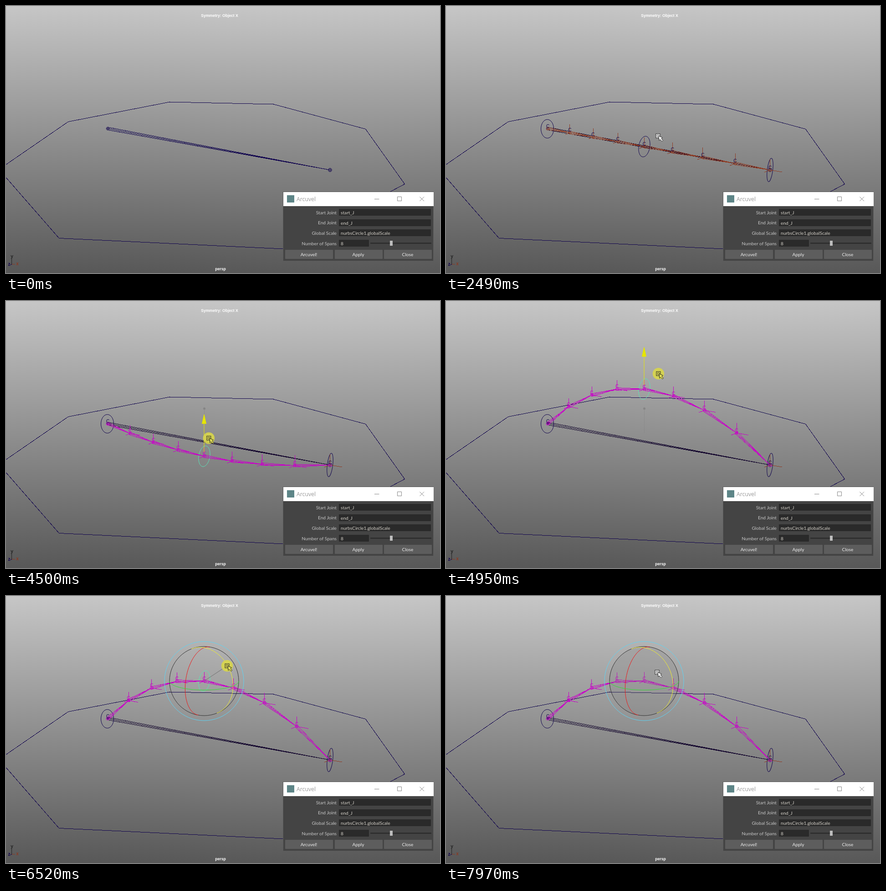
These frames come from a looping animation (953x587 px, 7990 ms). An HTML page:

```html
<!DOCTYPE html>
<html lang="en">
<head>
<meta charset="utf-8">
<title>Joint bend rig</title>
<style>
  html, body { margin: 0; width: 100%; height: 100%; overflow: hidden; background: #555; }
  svg { display: block; }
  text { font-family: Lato, "Open Sans", sans-serif; font-size: 10.2px; }
  .hud, .mark { font-family: "Liberation Sans", Arial, sans-serif; text-anchor: middle; }
  .hud { font-weight: bold; font-size: 8.6px; fill: #fff; }
  .mark { font-size: 10px; }
  .thin { fill: none; stroke-width: 1; }
  .crisp { shape-rendering: crispEdges; }
</style>
</head>
<body>
<svg width="953" height="587" viewBox="0 0 953 587">
  <defs>
    <linearGradient id="sky" x1="0" y1="0" x2="0" y2="1">
      <stop offset="0" stop-color="#c6c6c6"/><stop offset="1" stop-color="#585858"/>
    </linearGradient>
  </defs>
  <rect width="953" height="587" fill="url(#sky)"/>
  <text class="hud" x="469" y="24">Symmetry: Object X</text>
  <text class="hud" x="471" y="581">persp</text>
  <g class="thin">
    <path stroke="#222" d="M12.5 556V568"/><path stroke="#8a3a24" d="M13 567.5L20 568"/><path stroke="#13064f" d="M13 568L9 569"/>
  </g>
  <g font-weight="bold">
    <text class="mark" x="13" y="554" fill="#222">y</text>
    <text class="mark" x="7" y="571" fill="#13064f">z</text>
    <text class="mark" x="25" y="570" fill="#8a3a24">x</text>
  </g>

  <g class="thin" transform="translate(.5 .5)">
    <path class="crisp" stroke="#13064f" d="M-1 348.5L136 254L359 210.5L587 215.5L789 270L875 391L835 412M-1 376L116 510L640 535"/>
    <path id="mainBone" class="crisp"/>
    <path id="mainJoints" stroke="#13064f"/>

    <g id="rig">
      <g stroke="#13064f">
        <ellipse cx="222" cy="269.5" rx="14" ry="20.5"/>
        <ellipse cx="711" cy="360" rx="6" ry="26" transform="rotate(7 711 360)"/>
      </g>
      <path id="ring"/>
      <path id="endAxes" class="crisp" stroke="#8f3d25"/>
      <path id="bones" class="crisp"/>
      <path id="axes" class="crisp"/>
      <g id="marks" stroke="none"></g>
    </g>

    <g id="ghost" stroke="#868686" opacity=".6">
      <path d="M435 236V290"/><circle cx="435" cy="236" r="2.5" fill="#777"/>
    </g>
    <g id="mover">
      <path id="arrowX" stroke="#d02020" fill="#d02020"/>
      <path id="arrowZ" stroke="#2038d0" fill="#2038d0"/>
      <path id="arrowY" stroke="#e6e600" fill="#e6e600"/>
      <rect id="handle" x="-8" y="-8" width="16" height="16" stroke="#5fe0c8"/>
    </g>
    <g id="rotator">
      <circle id="ball" r="76" fill="#808080" fill-opacity=".25"/>
      <circle r="87" stroke="#5fd3f3"/>
      <circle r="76" stroke="#333"/>
      <path id="arcX" stroke="#f01818"/>
      <path id="arcY" stroke="#2fe02f"/>
      <path id="arcZ"/>
      <path id="sweep" stroke="#808080"/>
    </g>
  </g>

  <g id="dialog">
    <rect x="608.5" y="408.5" width="330" height="152" fill="#444" stroke="#5a5a5a"/>
    <rect x="609" y="409" width="330" height="31" fill="#fff"/>
    <rect x="617" y="416" width="16" height="16" fill="#5d8587"/>
    <text id="title" x="638" y="429" style="font:12.3px 'Open Sans',sans-serif">Arcuvel</text>
    <path class="thin" stroke="#888" d="M809 424.5H819.5M859.5 419.5H868.5V428.5H859.5ZM908.5 419.5L918 429M918 419.5L908.5 429"/>
    <g id="form"></g>
    <path d="M800 521.5H934" stroke="#262626" stroke-width="2"/>
    <rect x="843" y="516" width="6" height="11" fill="#bdbdbd"/>
  </g>

  <g id="cursor">
    <circle id="press" r="12.7" fill="#d8d64c" opacity=".92"/>
    <g id="picker" stroke="#222">
      <rect x="-4.5" y="-4.5" width="9" height="9"/><rect x="-2" y="-2" width="4" height="4" fill="none" stroke-width=".7"/>
      <path d="M1.5 0L2.5 10L5 8L9 12L11 10L7.5 6L10 4Z"/>
    </g>
    <path id="pointer" fill="#fff" stroke="#111" d="M.5 .5V16L4 12.7L6.5 18.5L9 17.4L6.6 11.8H11.5Z"/>
  </g>
</svg>
<script>
const $ = id => document.getElementById(id);
const set = (el, attrs) => { for (const k in attrs) el.setAttribute(k, attrs[k]); };
const show = (id, on) => { $(id).style.display = on ? '' : 'none'; };
const between = (t, a, b) => t >= a && t < b;
const ramp = (t, a, b) => {
  const s = Math.min(1, Math.max(0, (t - a) / (b - a)));
  return s * s * (3 - 2 * s);
};

const LOOP = 7990, SPANS = 8;
const NAVY = '#13064f', BROWN = '#8f3d25', MAGENTA = '#c800c8';

// Moments of the story, in ms.
const APPLY = 1290, BUILT = 1490, DESELECT = 2390, SELECT = 3010, MOVE_TOOL = 3560;
const GRAB = 3980, DROP = 5460, ROTATE_TOOL = 5640, TWIST = 6480, RELEASE = 7690, UNDO = 7720;
const PRESSES = [[APPLY, 1440], [2330, 2410], [2930, 3110], [GRAB, DROP], [TWIST, RELEASE]];

const liftAt = t => 69 * ramp(t, 4080, 4280) - 141 * ramp(t, 4280, 4620) +
  189 * ramp(t, 4620, 4970) + 5 * ramp(t, 5300, 5450);
const twistAt = t => 40 * ramp(t, 6520, 6870) - 73 * ramp(t, 6870, 7450);

function cursorAt(t) {
  let x = 842, y = 587;
  const go = (a, b, toX, toY) => {
    const e = ramp(t, a, b);
    x += (toX - x) * e;
    y += (toY - y) * e;
  };
  go(240, 520, 810, 551);
  go(750, 1260, 775, 547);
  go(1650, 2360, 465, 285);
  go(2480, 2760, 447, 286);
  go(3700, GRAB, 438, 270);
  x += 28 * ramp(t, 4280, 4970);
  y -= .96 * liftAt(t);
  go(6030, TWIST, 485, 153);
  const twist = twistAt(t);
  x += .2 * twist;
  y += .9 * twist - .015 * twist * twist;
  go(7670, 7970, 463, 167);
  return [x, y];
}

// World axes on screen for the camera's yaw and pitch; z points at the viewer.
function basis(angle) {
  const yaw = .58, pitch = .263;
  const [sy, cy, sp, cp] = [Math.sin(yaw), Math.cos(yaw), Math.sin(pitch), Math.cos(pitch)];
  const x = [cy, sy * sp, sy * cp], y = [0, -cp, sp], z = [-sy, cy * sp, cy * cp];
  const c = Math.cos(angle), s = Math.sin(angle);
  return { x: x.map((v, i) => v * c - y[i] * s), y: y.map((v, i) => v * c + x[i] * s), z };
}

const pt = (x, y) => x.toFixed(1) + ' ' + y.toFixed(1);
const line = (x, y, dx, dy) => `M${pt(x, y)}L${pt(x + dx, y + dy)}`;
const circle = (x, y, r) => `M${pt(x - r, y)}a${r} ${r} 0 1 0 ${2 * r} 0a${r} ${r} 0 1 0 ${-2 * r} 0`;

// Circle seen at an angle, starting with the half that faces the viewer.
function orbit([nx, ny, nz], r, sweep, cx = 0, cy = 0) {
  const flat = Math.hypot(nx, ny), ux = nx / flat, uy = ny / flat, steps = 40;
  const points = Array.from({ length: steps + 1 }, (_, i) => {
    const a = sweep * i / steps, major = r * Math.cos(a), minor = -r * nz * Math.sin(a);
    return pt(cx - uy * major + ux * minor, cy + ux * major + uy * minor);
  });
  return 'M' + points.join('L');
}

function arrow([dx, dy]) {
  const len = Math.hypot(dx, dy), nx = -dy / len * 4.5, ny = dx / len * 4.5, tip = 95;
  const neck = tip - 20 / len;
  return line(dx * 9, dy * 9, dx * (neck - 9), dy * (neck - 9)) +
    `M${pt(dx * neck + nx, dy * neck + ny)}L${pt(dx * tip, dy * tip)}L${pt(dx * neck - nx, dy * neck - ny)}Z`;
}

function bone([ax, ay], [bx, by], radius) {
  const dx = bx - ax, dy = by - ay, len = Math.hypot(dx, dy);
  const nx = -dy / len * radius, ny = dx / len * radius;
  return [-1, 0, 1].map(k => `M${pt(ax + nx * k, ay + ny * k)}L${pt(bx, by)}`).join('') +
    line(ax - nx, ay - ny, 2 * nx, 2 * ny);
}

// Evenly spaced joints in perspective, bent into a parabola and twisted around the middle.
function joint(i, lift, angle) {
  const u = i / SPANS, side = 2 * u - 1, bow = 1 - side * side;
  const depth = u + (1 - u) * 1.302, along = u / depth, near = 1.151 / depth;
  const arm = 215 * side * bow * near;
  return {
    x: 223 + 488 * along + arm * (lift / 2900 - 1 + Math.cos(angle)),
    y: 269 + 91 * along - lift * bow * near + arm * Math.sin(angle),
    near, turn: angle * (1 - Math.abs(side))
  };
}
const pose = (lift, angle) => Array.from({ length: SPANS + 1 }, (_, i) => joint(i, lift, angle));
const xy = j => [j.x, j.y];
const inner = i => i % SPANS !== 0;

function axesAt(j) {
  const { x, y, z } = basis(j.turn);
  return [[x, 28], [y, 21], [z, 20]]
    .map(([v, len]) => line(j.x, j.y, v[0] * len * j.near, v[1] * len * j.near)).join('');
}

function drawRig(t, joints, angle) {
  const built = t >= BUILT;
  show('rig', built);
  set($('mainBone'), { stroke: built ? '#170a30' : NAVY });
  const selected = !between(t, DESELECT, SELECT);
  const stroke = selected ? MAGENTA : BROWN;
  set($('ring'), {
    stroke: selected ? '#5be4b8' : NAVY,
    d: orbit(basis(angle).x, 23, 2 * Math.PI, ...xy(joints[4]))
  });
  set($('bones'), {
    stroke,
    d: joints.slice(1).map((j, i) => bone(xy(joints[i]), xy(j), 3)).join('') +
      joints.map(j => circle(j.x, j.y, 3)).join('')
  });
  set($('axes'), { stroke, d: joints.filter((_, i) => inner(i)).map(axesAt).join('') });
  marks.forEach((mark, i) => set(mark, {
    x: joints[i].x, y: joints[i].y - 2, fill: selected && inner(i) ? MAGENTA : NAVY
  }));
}

function drawManipulators(t, middle, angle, x, y, pressed) {
  const rotating = between(t, BUILT, DESELECT) || between(t, SELECT, MOVE_TOOL) || t >= ROTATE_TOOL;
  const dx = x - middle.x, dy = y - middle.y;
  const hover = rotating && !pressed && Math.hypot(dx, dy) < 76;
  const dragging = between(t, GRAB, DROP);
  show('mover', between(t, MOVE_TOOL, ROTATE_TOOL));
  show('arrowX', !dragging);
  show('arrowZ', !dragging);
  show('handle', t < 4100);
  show('ghost', dragging && t > 4100);
  show('rotator', rotating);
  show('ball', hover);
  show('ring', !hover);
  for (const id of ['mover', 'rotator']) set($(id), { transform: `translate(${pt(middle.x - .5, middle.y)})` });
  const axes = basis(angle);
  for (const k of 'xyz') set($('arc' + k.toUpperCase()), { d: orbit(axes[k], 76, Math.PI) });
  set($('arcZ'), { stroke: t >= TWIST ? '#f2ee30' : '#3040e0' });
  set($('sweep'), { d: pressed && t >= TWIST ? `M52 -34L0 0L${pt(dx, dy)}` : '' });
}

function drawCursor(t, x, y, pressed) {
  const overDialog = x > 608 && y > 408;
  show('cursor', t >= 240);
  show('press', pressed);
  show('picker', !overDialog);
  show('pointer', overDialog);
  set($('picker'), { fill: pressed ? '#dedb55' : '#fff' });
  set($('cursor'), { transform: `translate(${pt(x + .5, y + .5)})` });
}

function render(t) {
  const [x, y] = cursorAt(t);
  const angle = t < UNDO ? twistAt(t) * Math.PI / 180 : 0;
  const joints = pose(liftAt(t), angle);
  const pressed = PRESSES.some(([a, b]) => between(t, a, b));
  drawRig(t, joints, angle);
  drawManipulators(t, joints[4], angle, x, y, pressed);
  drawCursor(t, x, y, pressed);
  set($('title'), { fill: between(t, APPLY, DESELECT) ? '#222' : '#999' });
  set($('button1'), { fill: between(t, APPLY, 1440) ? '#333' : '#5d5d5d' });
}

function buildForm() {
  const rows = [['Start Joint', 'start_J'], ['End Joint', 'end_J'],
    ['Global Scale', 'nurbsCircle1.globalScale'], ['Number of Spans', SPANS]];
  const fields = rows.map(([label, value], i) => {
    const y = 446 + i * 22.7;
    return `<rect x="731" y="${Math.round(y)}" width="${i < 3 ? 202 : 66}" height="15" rx="1" fill="#2a2a2a"/>
      <text x="726" y="${y + 11.5}" text-anchor="end" fill="#c6c6c6">${label}</text>
      <text x="735" y="${y + 12}" fill="#d4d0c8">${value}</text>`;
  });
  const buttons = ['Arcuvel!', 'Apply', 'Close'].map((label, i) => {
    const x = 613 + i * 108.5;
    return `<rect id="button${i}" x="${Math.round(x)}" y="536" width="105" height="20" rx="1" fill="#5d5d5d"/>
      <text x="${x + 52}" y="550" text-anchor="middle" fill="#eee">${label}</text>`;
  });
  $('form').innerHTML = fields.concat(buttons).join('');
}

function buildScene() {
  const rest = pose(0, 0), first = rest[0], last = rest[SPANS];
  const bead = ({ x, y }, r) => circle(x, y, r) + line(x - r, y, 2 * r, 0) + line(x, y - r, 0, 2 * r);
  set($('mainBone'), { d: bone(xy(first), xy(last), 3) });
  set($('mainJoints'), { d: bead(first, 3.2) + bead(last, 3.8) });
  set($('endAxes'), { d: axesAt(last) });
  const axes = basis(0);
  for (const k of 'xyz') set($('arrow' + k.toUpperCase()), { d: arrow(axes[k]) });
  $('marks').innerHTML = rest.map(() => '<text class="mark">C</text>').join('');
}

buildForm();
buildScene();
const marks = [...$('marks').children];
const start = performance.now();
function tick() {
  render((performance.now() - start) % LOOP);
  requestAnimationFrame(tick);
}
tick();
</script>
</body>
</html>
```
